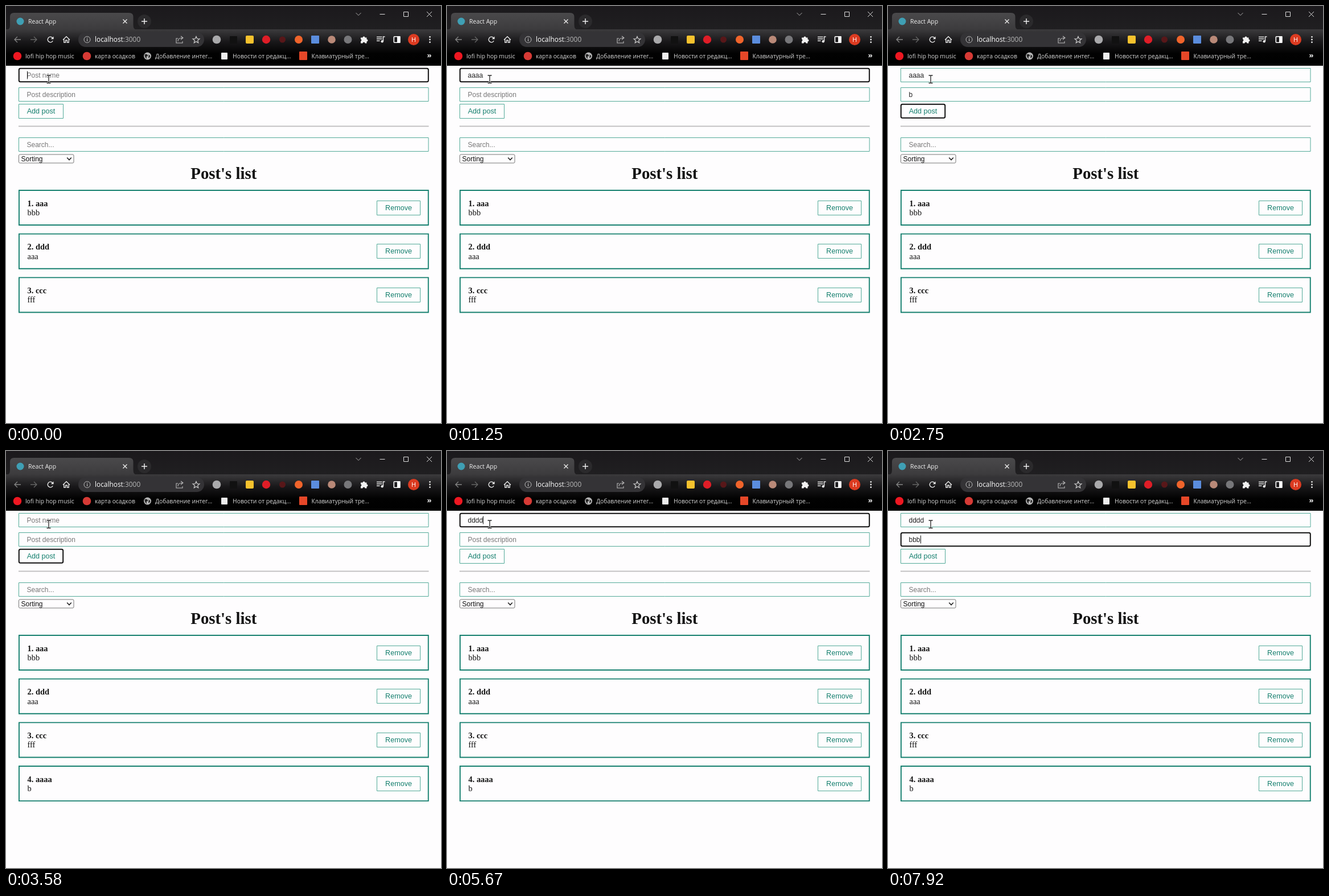
These frames come from a looping animation (764x733 px, 8000 ms). An HTML page with a canvas:

```html
<!DOCTYPE html>
<html lang="en">
<head>
<meta charset="utf-8">
<title>Posts</title>
<style>
html, body { margin: 0; width: 100%; height: 100%; overflow: hidden; background: #fefdfe; }
canvas { display: block; }
</style>
</head>
<body>
<canvas id="stage" width="764" height="733"></canvas>
<script>
const ctx = document.getElementById('stage').getContext('2d', { alpha: false });
const LOOP = 8000;
const TEAL = '#16806f', THIN = '#52aa98', INK = '#111';
const UI = '"Open Sans", "Noto Sans", sans-serif';
const ARIAL = '"Liberation Sans", Arial, sans-serif';
const TIMES = '"Liberation Serif", "Times New Roman", serif';

// [time, focus, name, description, post added]
const STATES = [
  [0, 'name', '', '', false],
  [330, 'name', 'a', '', false],
  [420, 'name', 'aa', '', false],
  [500, 'name', 'aaa', '', false],
  [580, 'name', 'aaaa', '', false],
  [1420, 'desc', 'aaaa', '', false],
  [1830, 'desc', 'aaaa', 'b', false],
  [2420, 'add', 'aaaa', 'b', false],
  [2920, 'add', '', '', true],
  [4080, 'desc', '', '', true],
  [4330, 'name', '', '', true],
  [5170, 'name', 'd', '', true],
  [5330, 'name', 'dd', '', true],
  [5500, 'name', 'ddd', '', true],
  [5670, 'name', 'dddd', '', true],
  [6330, 'desc', 'dddd', '', true],
  [7170, 'desc', 'dddd', 'b', true],
  [7420, 'desc', 'dddd', 'bb', true],
  [7670, 'desc', 'dddd', 'bbb', true]
];
const POSTS = [['aaa', 'bbb'], ['ddd', 'aaa'], ['ccc', 'fff'], ['aaaa', 'b']];

function text(str, x, y, font, color, align = 'left') {
  ctx.font = font;
  ctx.fillStyle = color;
  ctx.textAlign = align;
  ctx.fillText(str, x, y);
}

function rect(x, y, w, h, color) {
  ctx.fillStyle = color;
  ctx.fillRect(x, y, w, h);
}

function round(x, y, w, h, r, color) {
  ctx.beginPath();
  ctx.roundRect(x, y, w, h, r);
  ctx.fillStyle = color;
  ctx.fill();
}

function frame(x, y, w, h, color, width, r = 0) {
  ctx.beginPath();
  ctx.roundRect(x + width / 2, y + width / 2, w - width, h - width, r);
  ctx.strokeStyle = color;
  ctx.lineWidth = width;
  ctx.stroke();
}

function dot(x, y, r, color) {
  ctx.beginPath();
  ctx.arc(x, y, r, 0, Math.PI * 2);
  ctx.fillStyle = color;
  ctx.fill();
}

function ring(x, y, r, color, width = 1, from = 0, to = Math.PI * 2) {
  ctx.beginPath();
  ctx.arc(x, y, r, from, to);
  ctx.strokeStyle = color;
  ctx.lineWidth = width;
  ctx.stroke();
}

// Strokes an SVG path placed relative to (x, y).
function path(x, y, d, color, width = 1.3, fill = false) {
  ctx.save();
  ctx.translate(x, y);
  const p = new Path2D(d);
  ctx.lineWidth = width;
  ctx.strokeStyle = ctx.fillStyle = color;
  fill ? ctx.fill(p) : ctx.stroke(p);
  ctx.restore();
}

function fade(y0, y1, ...colors) {
  const g = ctx.createLinearGradient(0, y0, 0, y1);
  colors.forEach((c, i) => g.addColorStop(i / (colors.length - 1), c));
  return g;
}

function drawTabs() {
  rect(0, 0, 764, 42, fade(0, 42, '#1b191c', '#201f21'));
  ctx.beginPath();
  ctx.moveTo(0, 42);
  ctx.quadraticCurveTo(7, 42, 7, 34);
  ctx.lineTo(7, 19);
  ctx.quadraticCurveTo(7, 12, 14, 12);
  ctx.lineTo(216, 12);
  ctx.quadraticCurveTo(223.5, 12, 223.5, 19);
  ctx.lineTo(223.5, 34);
  ctx.quadraticCurveTo(223.5, 42, 231, 42);
  ctx.fillStyle = fade(12, 42, '#4a494b', '#3c3b3d');
  ctx.fill();
  dot(25, 27, 6.5, '#3f9fb4');
  text('React App', 39, 31, '10.5px ' + UI, '#eee');
  path(209, 27, 'M-3.5-3.5 3.5 3.5M3.5-3.5-3.5 3.5', '#eee', 1.3);
  dot(243, 27, 12, '#2b2a2c');
  path(243, 27, 'M-5 0H5M0-5V5', '#eee', 1.5);
  path(619, 14, 'M-4.5-2 0 2.5 4.5-2', '#aaa', 1);
  path(661, 14.5, 'M-4.5 0H4.5', '#ddd', 1);
  frame(698, 10, 9, 9, '#ddd', 1);
  path(743.5, 14.5, 'M-4.5-4.5 4.5 4.5M4.5-4.5-4.5 4.5', '#ddd', 1);
}

function drawToolbar() {
  const light = '#e8e8e8';
  rect(0, 41, 764, 64, fade(41, 105, '#3c3b3d', '#19181a', '#020202', '#000'));
  path(20, 59, 'M6 0H-5M0-5-5 0 0 5', '#858585');
  path(49, 59, 'M-6 0H5M0-5 5 0 0 5', '#666');
  ring(78, 59, 4.7, light, 1.5, 0.5, 5.6);
  path(78, 59, 'M5.6-5.6V-.8H.8Z', light, 1, true);
  path(106, 59, 'M-6 .5 0-5.2 6 .5M-4.2-.5V5H-1.4V1.2H1.4V5H4.2V-.5', light, 1.4);

  round(127, 46, 221, 26, 13, '#343336');
  ring(142.5, 59, 5.5, '#bbb', 1);
  rect(142, 58, 1.2, 4, '#bbb');
  rect(142, 55.7, 1.2, 1.3, '#bbb');
  text('localhost', 156, 63, '11.9px ' + UI, '#fff');
  const hostWidth = ctx.measureText('localhost').width;
  text(':3000', 156 + hostWidth, 63, '11.9px ' + UI, '#b5b5b5');
  path(305, 59, 'M-3-2H-6V6H5V3M-3 3C-3-1 0-3 5-3M2-6 6-3 2 0', '#bbb', 1.1);
  path(334, 59.5, 'M0-6 1.7-2 6-1.7 2.7 1 3.7 5.3 0 3-3.7 5.3-2.7 1-6-1.7-1.7-2Z', '#ccc', 1.2);

  dot(370, 59, 7.3, '#a9a9ab');
  round(393, 53, 13, 13, 1, '#111');
  round(421, 52, 14, 14, 2, '#f6c22d');
  dot(457, 59, 7.2, '#df1d27');
  dot(485.5, 59, 5.5, '#581719');
  dot(514, 59, 7, '#f0642b');
  round(536, 52, 14, 14, 1, '#5b8ddd');
  dot(572, 59, 6.8, '#b98978');
  dot(600.5, 59, 7, '#77777a');

  path(629, 59, 'M-6-3.5H-2.5A2 2 0 1 1 1.5-3.5H4.5V-.5A2 2 0 1 1 4.5 3.5V6.5H1.5A2 2 0 0 0-2.5 6.5H-6V3A2 2 0 0 0-6-.8Z', '#f2f2f2', 1, true);
  path(658, 59, 'M-7-4.5H2.5M-7-1.2H2.5M-7 2.2H-1.5M4.5 3V-5H7.5', light, 1.5);
  dot(2.7 + 658, 62.3, 2.2, light);
  frame(680.5, 53, 12, 12, '#fff', 1.6, 1);
  rect(687, 53, 5.5, 12, '#fff');
  dot(716, 59, 10, '#dc3b21');
  text('H', 716, 63, '11px ' + UI, '#fff', 'center');
  for (const dy of [-4.7, 0, 4.7]) dot(744.5, 59 + dy, 1.4, light);
}

function drawBookmarks() {
  const font = '10.35px ' + UI;
  dot(20, 88, 7.3, '#ee1721');
  dot(142, 88, 7.3, '#d63a35');
  dot(248.5, 88, 6.5, '#b9b9b9');
  path(248.5, 88, 'M-5-2.5Q-2-4.5 0-2.2T-2 1L-1.2 5Q-5 2.5-5-2.5M2-5Q1-2 3.5-1.8L5 .3 2.5 4Q1 1.5 2 0', '#252525', 1, true);
  round(378, 82, 11, 12, 1, '#eee');
  round(515, 80, 14, 15, 1, '#e64728');
  const labels = [
    ['lofi hip hop music', 34],
    ['карта осадков', 156],
    ['Добавление интег...', 262],
    ['Новости от редакц...', 398],
    ['Клавиатурный тре...', 536.5]
  ];
  for (const [label, x] of labels) text(label, x, 91.5, font, '#d5d5d5');
  text('»', 743.5, 91, 'bold 13px ' + UI, '#eee', 'center');
}

function drawField(y, value, hint, focused, caretOn) {
  if (focused) frame(21.8, y - 0.3, 721, 25.6, '#111', 2, 2.5);
  else frame(22, y, 720.5, 25, THIN, 1);
  text(value || hint, 36.5, y + 16.6, '12px ' + ARIAL, value ? '#222' : '#777');
  if (focused && caretOn) {
    const x = 36.5 + (value ? ctx.measureText(value).width : 0);
    rect(Math.round(x), y + 5.5, 1, 14, '#111');
  }
}

function drawButton(label, x, y, w, focused) {
  if (focused) frame(x - 0.2, y - 0.2, w + 0.4, 26, '#111', 2, 2.5);
  else frame(x, y, w, 26, THIN, 1);
  text(label, x + w / 2, y + 17, '12.6px ' + ARIAL, TEAL, 'center');
}

function drawPost([title, body], i) {
  const y = 323 + i * 76.7;
  frame(22, y, 720.7, 63, TEAL, 1.9);
  text(`${i + 1}. ${title}`, 37.5, y + 28.5, 'bold 14.4px ' + TIMES, INK);
  text(body, 37.5, y + 44.8, '14.4px ' + TIMES, INK);
  drawButton('Remove', 651, Math.round(y + 18.7), 77, false);
}

function drawPointer() {
  const shape = 'M-3.5-6.5H-1Q0-6.5 0-5.5Q0-6.5 1-6.5H3.5M0-5.5V6M-3.5 7H-1Q0 7 0 6Q0 7 1 7H3.5';
  path(75, 128.5, shape, '#fff', 3);
  path(75, 128.5, shape, '#222', 1.3);
}

function drawPage(state, t) {
  const [since, focus, name, desc, added] = state;
  const caretOn = (t - since) % 1000 < 500;
  rect(0, 104.5, 764, 629, '#fefdfe');
  drawField(109, name, 'Post name', focus === 'name', caretOn);
  drawField(143, desc, 'Post description', focus === 'desc', caretOn);
  drawButton('Add post', 22, 172, 79, focus === 'add');
  rect(22, 210.5, 720.5, 1.8, '#bdbcbd');
  drawField(231, '', 'Search...', false, false);
  frame(22, 260.5, 97.5, 16, '#777', 1, 2);
  text('Sorting', 26.5, 272.5, '12px ' + ARIAL, INK);
  path(111, 268.5, 'M-3.8-2 0 2 3.8-2', '#222', 1.6);
  text("Post's list", 382.3, 303.5, 'bold 28.8px ' + TIMES, INK, 'center');
  POSTS.slice(0, added ? 4 : 3).forEach(drawPost);
  drawPointer();
}

function render(t) {
  const state = STATES.findLast(s => s[0] <= t);
  drawPage(state, t);
  drawTabs();
  drawToolbar();
  drawBookmarks();
}

const start = performance.now();
function tick() {
  render((performance.now() - start) % LOOP);
  requestAnimationFrame(tick);
}
tick();
</script>
</body>
</html>
```
